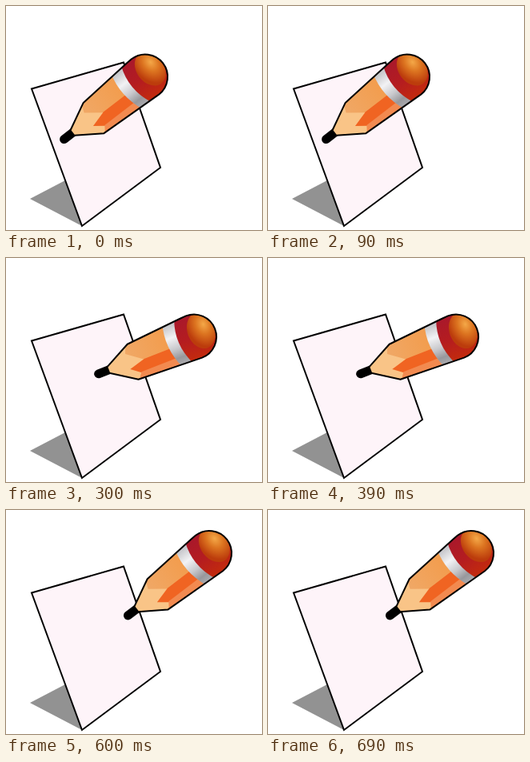
An HTML page that plays this animation: 320x280 px, repeating every 750 ms.

```html
<!DOCTYPE html>
<html lang="en">
<head>
<meta charset="utf-8">
<title>Pencil and paper</title>
<style>
  html, body { margin: 0; width: 100%; height: 100%; overflow: hidden; background: #fff; }
  svg { display: block; width: 100vw; height: 100vh; }
</style>
</head>
<body>
<svg viewBox="0 0 320 280">
  <defs>
    <linearGradient id="upper" x1="0" y1="0" x2="1" y2="0">
      <stop offset="0" stop-color="#f0a866"/>
      <stop offset="1" stop-color="#f39a48"/>
    </linearGradient>
    <linearGradient id="metal" x1="0" y1="0" x2="0" y2="1">
      <stop offset=".1" stop-color="#c8c8cc"/>
      <stop offset=".35" stop-color="#f2f2f4"/>
      <stop offset=".6" stop-color="#c8c8cc"/>
      <stop offset=".8" stop-color="#98989c"/>
      <stop offset="1" stop-color="#b0b0b4"/>
    </linearGradient>
    <linearGradient id="rubber" x1="0" y1="0" x2="0" y2="1">
      <stop offset="0" stop-color="#a8182c"/>
      <stop offset=".5" stop-color="#b41c20"/>
      <stop offset="1" stop-color="#c42c0c"/>
    </linearGradient>
    <radialGradient id="cap" cx=".66" cy=".36" r=".62">
      <stop offset="0" stop-color="#f4a848"/>
      <stop offset=".45" stop-color="#dc7420"/>
      <stop offset="1" stop-color="#bc3c0c"/>
    </radialGradient>
    <clipPath id="shape">
      <path id="body" d="M-115-4L-81-21.5L-8-27.5L0-28A28 28 0 0 1 0 28L-84 24.5L-115 4Z"/>
    </clipPath>
  </defs>

  <path d="M30 241L74 218L95 275Z" fill="#929292"/>
  <path d="M32 103.5L147 70.5L193 202L95 275Z" fill="#fef4f9" stroke="#000" stroke-width="2"/>

  <!-- Local origin: centre of the eraser; the tip points along -x -->
  <g id="pencil">
    <path d="M-128 0H-113" stroke="#000" stroke-width="11" stroke-linecap="round"/>
    <g clip-path="url(#shape)">
      <path d="M-120-30H30V30H-120Z" fill="#f9c487"/>
      <path d="M-80-30H-20V4H-68L-88-11Z" fill="url(#upper)"/>
      <path d="M-68 3H-20V18H-77L-89 9Z" fill="#f06422"/>
      <path d="M-77 17H-20V30H-86Z" fill="#f28a50"/>
      <path d="M-31-30Q-40 0-27 30H0V-30Z" fill="url(#metal)"/>
      <path d="M-15-30Q-27 0-13 30H30V-30Z" fill="url(#rubber)"/>
      <ellipse cx="11" cy="-4" rx="17" ry="23" fill="url(#cap)"/>
    </g>
    <use href="#body" fill="none" stroke="#000" stroke-width="2" stroke-linejoin="round"/>
  </g>
</svg>
<script>
  const HOLD = 150;
  // Eraser x, y and tilt in degrees
  const poses = [
    [174, 88.5, -37.6],
    [185, 67.5, -46.4],
    [235, 98.5, -21.2],
    [212, 38, -54.3],
    [254, 54, -37.5]
  ];
  const pencil = document.getElementById("pencil");

  function draw() {
    const [x, y, tilt] = poses[Math.floor(performance.now() / HOLD) % poses.length];
    pencil.setAttribute("transform", `translate(${x} ${y}) rotate(${tilt})`);
    requestAnimationFrame(draw);
  }
  draw();
</script>
</body>
</html>
```
